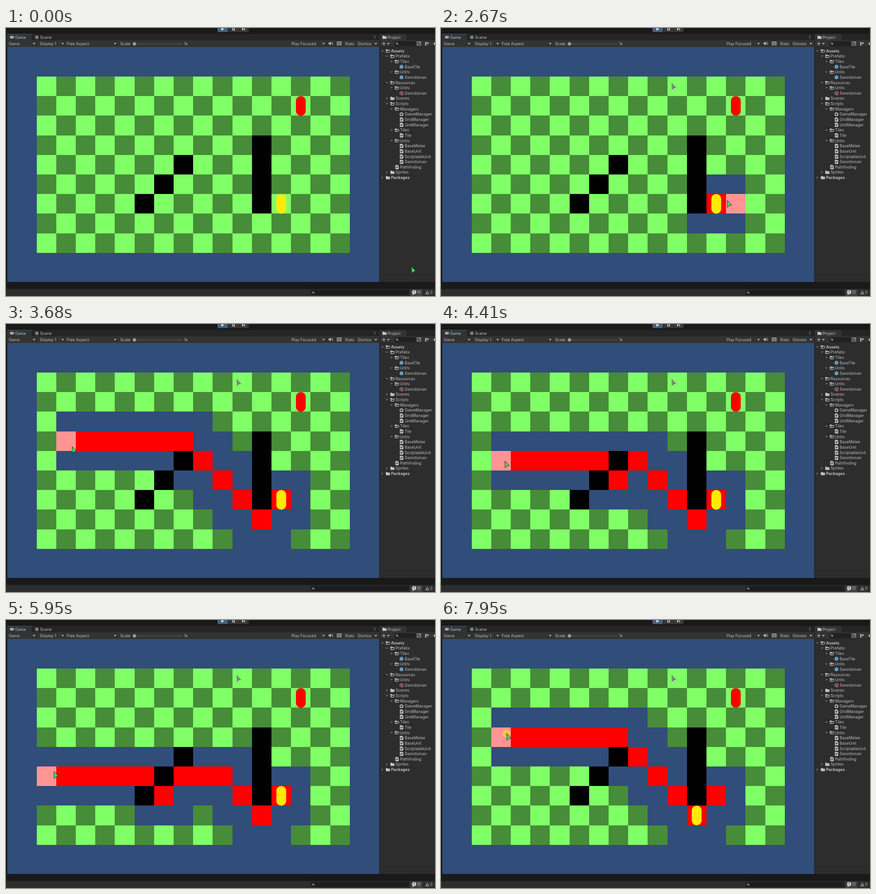
An HTML page that plays this animation: 947x591 px, repeating every 8 s.

```html
<!DOCTYPE html>
<html lang="en">
<head>
<meta charset="utf-8">
<title>Grid pathfinding</title>
<style>
html, body { margin: 0; width: 100%; height: 100%; overflow: hidden; background: #191919; }
svg { display: block; width: 947px; height: 591px; }
text { font: 8.7px Inter, Roboto, sans-serif; fill: #bcbcbc; white-space: pre; }
</style>
</head>
<body>
<svg id="stage" viewBox="0 0 947 591"></svg>
<script>
const stage = document.getElementById('stage');
const LOOP = 8000, STEP = 66.8;
const CELL = 43.2, LEFT = 67.6, TOP = 107, COLS = 16, ROWS = 9;
const LIGHT = '#80ff66', DARK = '#478c39', BLUE = '#314d79', RED = '#ff0000', PINK = '#ff9494';
const SELECT = 2260, ENTER = 2595, MOVE = 7940;

function add(tag, attrs, text) {
  const el = document.createElementNS('http://www.w3.org/2000/svg', tag);
  for (const k in attrs) el.setAttribute(k, attrs[k]);
  if (text !== undefined) el.textContent = text;
  return stage.appendChild(el);
}
const box = (x, y, width, height, fill, rx = 0) => add('rect', { x, y, width, height, fill, rx });
const dot = (cx, cy, r, fill) => add('circle', { cx, cy, r, fill });
const shape = (d, fill) => add('path', { d, fill });
const line = (d, stroke, w = 1) => add('path', { d, stroke, fill: 'none', 'stroke-width': w });
const label = (x, y, s, extra = {}) => add('text', { x, y: y + 3.1, ...extra }, s);
const down = (x, y, fill = '#b4b4b4') => shape(`M${x - 3} ${y - 1.5}h6l-3 3.5z`, fill);
const right = (x, y) => shape(`M${x - 1.5} ${y - 3}v6l3.5-3z`, '#6c6c6c');
const lens = (x, y) => {
  add('circle', { cx: x, cy: y, r: 1.7, fill: 'none', stroke: '#c4c4c4' });
  line(`M${x + 1.2} ${y + 1.2}l2 2`, '#c4c4c4');
};

// Window chrome
function drawChrome() {
  box(0, 0, 947, 591, '#191919');
  box(467, -2, 23, 11, '#46607c', 2);
  box(491, -2, 45, 11, '#363636', 2);
  shape('M475.5-1v7l6-3.5z', '#d8e8f6');
  shape('M499.500-1h2v7h-2zM503-1h2v7h-2z', '#c4c4c4');
  shape('M521-1v7l4.500-3.5zM526-1h1.600v7h-1.600z', '#c4c4c4');

  box(2, 13, 822, 14, '#252525');
  box(2, 13, 55, 15, '#333');
  box(2, 13, 55, 1.2, '#2c5d87');
  box(2, 27, 822, 15, '#333');
  box(3, 42, 821, 518, BLUE);
  box(825, 13, 122, 547, '#2d2d2d');
  box(825, 13, 122, 14, '#252525');
  box(825, 13, 59, 14, '#333');
  box(825, 27, 122, 15, '#333');
  box(825, 41, 122, 1, '#222');
  box(825, 545, 122, 1, '#1f1f1f');
  box(0, 575, 947, 16, '#2d2d2d');
  box(0, 575, 947, 1, '#222');

  box(8.500, 17.500, 9, 5.500, '#c4c4c4', 2.700);
  dot(11, 20.200, 1, '#333');
  dot(15, 20.200, 1, '#333');
  label(20, 20.500, 'Game');
  line('M66.500 16.500v8M69.500 16.500v8M64 19h8M64 22h8', '#c4c4c4');
  label(75, 20.500, 'Scene');
  for (const y of [17.5, 20, 22.5]) dot(814, y, .8, '#c4c4c4');

  const bar = [[6, 'Game'], [75, 'Display 1'], [134, 'Free Aspect'], [252, 'Scale'],
    [393, '1x'], [630, 'Play Focused'], [748, 'Stats'], [776, 'Gizmos']];
  for (const [x, s] of bar) label(x, 34.5, s);
  for (const x of [62, 125, 241, 701, 816.5]) down(x, 34.5);
  for (const x of [69, 129, 247, 708, 726, 744, 772]) box(x, 28, .8, 13, '#282828');
  box(288, 34.500, 101, 1, '#666');
  dot(283.500, 35, 3.800, '#999');
  shape('M712 32.500h2l3-2.500v8l-3-2.500h-2z', '#c4c4c4');
  line('M718.500 32q1.500 2 0 4M720 30.500q2.500 3.500 0 7', '#c4c4c4', .8);
  add('rect', { x: 731, y: 30.5, width: 9, height: 7, fill: 'none', stroke: '#c4c4c4' });
  line('M731 33h9M731 35.300h9M734 30.500v5M737 30.500v5', '#c4c4c4', .7);

  folder(835.5, 20.5);
  label(842, 20.5, 'Project');
  line('M830 34.500h8M834 30.500v8', '#c4c4c4', 1.2);
  down(844, 34.5);
  box(858, 29, 47, 11, '#212121', 2);
  lens(863, 34);
  add('rect', { x: 907.5, y: 30.5, width: 8, height: 7.5, fill: 'none', stroke: '#b4b4b4' });
  line('M909.500 36.500l4-4M911 32.300h2.700v2.700', '#b4b4b4');
  shape('M925 31h3.500v3.500H925zM925 35.500h3.500v3H925z', '#b4b4b4');
  dot(931, 33.5, 2, '#b4b4b4');
  shape('M947 31v7l-4-3.500z', '#b4b4b4');

  box(673, 577.500, 217, 11.500, '#1e1e1e', 2);
  lens(678, 583);
  box(893, 576, 26, 15, '#404040');
  dot(901, 582.500, 4.600, '#d4d4d4');
  shape('M898 585l-1 4 4-2z', '#d4d4d4');
  box(900.400, 579.500, 1.300, 4, '#333');
  box(900.400, 584.300, 1.300, 1.300, '#333');
  shape('M930 578l5 9.500h-10z', '#858585');
  box(929.500, 581.500, 1.100, 3, '#2d2d2d');
  box(929.500, 585.300, 1.100, 1.100, '#2d2d2d');
  label(936, 583, '0');
}

function folder(x, y, open) {
  shape(`M${x - 4.5} ${y - 3.5}h3.500l1 1.200h4v1.300h-8.500z`, '#c2c2c2');
  if (open) {
    line(`M${x - 4} ${y - 3}v6h7`, '#c2c2c2');
    line(`M${x - 3} ${y + 3}l1.500-4h6.500l-1.500 4z`, '#c2c2c2', .9);
  } else box(x - 4.5, y - 2, 9, 5.5, '#c2c2c2', .5);
}

const icons = {
  o: (x, y) => folder(x, y, true),
  c: (x, y) => folder(x, y),
  s: (x, y) => {
    shape(`M${x - 3.5} ${y - 4.5}h5l2.500 2.500v6.500h-7.500z`, '#d0d0d0');
    line(`M${x - .7} ${y - 2.3}l-.5 5M${x + 1.5} ${y - 2.3}l-.5 5M${x - 2.2} ${y - .7}h4.800M${x - 2.4} ${y + 1.3}h4.800`, '#333', .8);
  },
  p: (x, y) => {
    shape(`M${x} ${y - 4.5}l4 2v5l-4 2-4-2v-5z`, '#6fb4d2');
    line(`M${x - 4} ${y - 2.5}l4 2 4-2M${x} ${y - .5}v5`, '#2f5366', .8);
  },
  a: (x, y) => {
    line(`M${x} ${y - 4}l3.500 2v4l-3.500 2-3.500-2v-4zM${x - 3.5} ${y - 2}l3.500 2 3.500-2M${x} ${y}v4`, '#b0b0b0', .9);
    box(x + 1, y + .5, 3.5, 4, '#d2303c');
  },
  g: (x, y) => {
    add('circle', { cx: x, cy: y, r: 3, fill: 'none', stroke: '#a9b4bc', 'stroke-width': 2 });
    add('circle', { cx: x, cy: y, r: 4, fill: 'none', stroke: '#a9b4bc', 'stroke-dasharray': '1.6 1.5' });
  }
};

// depth, icon, name, arrow (v open, > closed)
const tree = `0 o Assets v|1 o Prefabs v|2 o Tiles v|3 p BaseTile|2 o Units v|3 p Swordsman|1 o Resources v
2 o Units v|3 a Swordsman|1 c Scenes >|1 o Scripts v|2 o Managers v|3 g GameManager|3 s GridManager|3 s UnitManager
2 o Tiles v|3 s Tile|2 o Units v|3 s BaseMelee|3 s BaseUnit|3 s ScriptableUnit|3 s Swordsman|2 s Pathfinding
1 c Sprites >|0 c Packages >`.split(/[|\n]/);

function drawTree() {
  tree.forEach((row, i) => {
    const [depth, icon, name, arrow] = row.split(' ');
    const x = 831 + depth * 10, y = 50.6 + i * 11.64;
    if (arrow === 'v') down(x, y, '#6c6c6c');
    if (arrow === '>') right(x, y);
    icons[icon](x + 12, y);
    label(x + 19, y, name, depth === '0' ? { 'font-weight': 700, style: 'font-weight:700' } : {});
  });
}

// Board
const wall = (c, r) => (c === 11 && r > 2 && r < 7) || (c + r === 11 && c > 4 && c < 8);
const inside = (c, r) => c >= 0 && r >= 0 && c < COLS && r < ROWS;
const same = (a, b) => a[0] === b[0] && a[1] === b[1];
const START = [12, 6];

function around([c, r]) {
  const list = [];
  for (let dr = 1; dr >= -1; dr--)
    for (let dc = -1; dc <= 1; dc++)
      if ((dc || dr) && inside(c + dc, r + dr) && !wall(c + dc, r + dr)) list.push([c + dc, r + dr]);
  return list;
}
function dist(a, b) {
  const x = Math.abs(a[0] - b[0]), y = Math.abs(a[1] - b[1]);
  return 10 * Math.max(x, y) + 4 * Math.min(x, y);
}
// Left-hand goals go round the foot of the wall, then straight on by lowest cost.
function findPath(goal) {
  const path = goal[0] < 11 ? [START, [11, 7], [10, 6]] : [START];
  for (let n = 0; n < 30; n++) {
    const here = path[path.length - 1];
    if (same(here, goal)) break;
    const cost = p => dist(here, p) + dist(p, goal) * 1.001;
    const open = around(here).filter(p => !path.some(q => same(p, q)));
    if (!open.length) break;
    path.push(open.reduce((best, p) => cost(p) < cost(best) ? p : best));
  }
  return path;
}

const tiles = [];
function drawBoard() {
  for (let r = 0; r < ROWS; r++)
    for (let c = 0; c < COLS; c++) {
      const el = box(LEFT + c * CELL, TOP + r * CELL, CELL, CELL, '#000');
      el.setAttribute('shape-rendering', 'crispEdges');
      tiles.push(el);
    }
}
const unit = (c, r, fill) => box(LEFT + (c + .25) * CELL, TOP + r * CELL, CELL / 2, CELL, fill, CELL / 4);

// Pointer: time, x, y
const track = [
  [0, 895, 526], [70, 893, 522], [350, 650, 260], [600, 413, 50], [790, 478, 4],
  [930, 478, 4], [1205, 509, 121], [1730, 652, 424], [1770, 652, 424], [2070, 715, 380],
  [2330, 618, 384], [2400, 616, 384], [2540, 616, 384], [2605, 630, 384], [2672, 632, 380],
  [2870, 490, 285], [3073, 366, 224], [3273, 222, 228], [3340, 206, 241], [3600, 152, 262],
  [3800, 136, 284], [4210, 144, 300], [4410, 141, 302], [4545, 141, 302], [5150, 106, 334],
  [5950, 106, 334], [6200, 118, 380], [6350, 124, 376], [6613, 129, 311], [6690, 132, 295],
  [6820, 134, 289], [6890, 134, 289], [7085, 144, 251], [7230, 144, 251], [7490, 145, 250], [8000, 145, 250]
];
function pointer(t) {
  const i = Math.max(1, track.findIndex(k => k[0] >= t));
  const [t0, x0, y0] = track[i - 1], [t1, x1, y1] = track[i];
  const p = (t - t0) / (t1 - t0);
  return [x0 + (x1 - x0) * p, y0 + (y1 - y0) * p];
}
function goalAt(t) {
  for (; t >= SELECT; t -= STEP) {
    const [x, y] = pointer(t);
    const c = Math.floor((x - LEFT) / CELL), r = Math.floor((y - TOP) / CELL);
    if (inside(c, r) && !wall(c, r)) return t < ENTER ? START : [c, r];
  }
  return START;
}

function paintBoard(t) {
  const fill = tiles.map((_, i) => {
    const c = i % COLS, r = (i - c) / COLS;
    return wall(c, r) ? '#000' : (c + r) % 2 ? DARK : LIGHT;
  });
  if (t >= SELECT) {
    const set = ([c, r], color) => { fill[r * COLS + c] = color; };
    const goal = goalAt(t), path = findPath(goal);
    path.slice(0, -1).forEach(p => around(p).forEach(q => set(q, BLUE)));
    path.forEach(p => set(p, RED));
    set(goal, PINK);
  }
  tiles.forEach((el, i) => el.setAttribute('fill', fill[i]));
}

drawChrome();
drawTree();
drawBoard();
unit(13, 1, RED);
const hero = unit(...START, '#ffeb04');
const count = label(907, 583, '10');
const ARROW = 'M0 0L.5 15.500L3.700 11.500L9.500 10.500Z';
const trail = shape(ARROW, '#828282');
trail.setAttribute('transform', 'translate(509 120.500) scale(1.1)');
const click = dot(0, 0, 9, '#ffc34a');
click.setAttribute('fill-opacity', .92);
const cursor = add('path', { d: ARROW, fill: '#3fe46a', stroke: '#12331c', 'stroke-width': 1, 'stroke-linejoin': 'round' });

function show(el, on) { el.setAttribute('visibility', on ? 'visible' : 'hidden'); }

let last = -1;
function frame(now) {
  const n = Math.floor((now % LOOP + 6) / STEP);
  if (n !== last) {
    last = n;
    const t = Math.min(n * STEP, LOOP);
    const [x, y] = pointer(t);
    paintBoard(t);
    cursor.setAttribute('transform', `translate(${x} ${y})`);
    click.setAttribute('cx', x - .5);
    click.setAttribute('cy', y + .7);
    show(click, (t >= SELECT && t < 2390) || t >= MOVE);
    show(trail, t > 1200);
    const moved = t >= MOVE;
    hero.setAttribute('x', LEFT + (moved ? 11.25 : 12.25) * CELL);
    hero.setAttribute('y', TOP + (moved ? 7 : 6) * CELL);
    count.textContent = t < SELECT ? 10 : t < ENTER ? 11 : 12;
  }
  requestAnimationFrame(() => frame(performance.now()));
}
frame(0);
</script>
</body>
</html>
```
